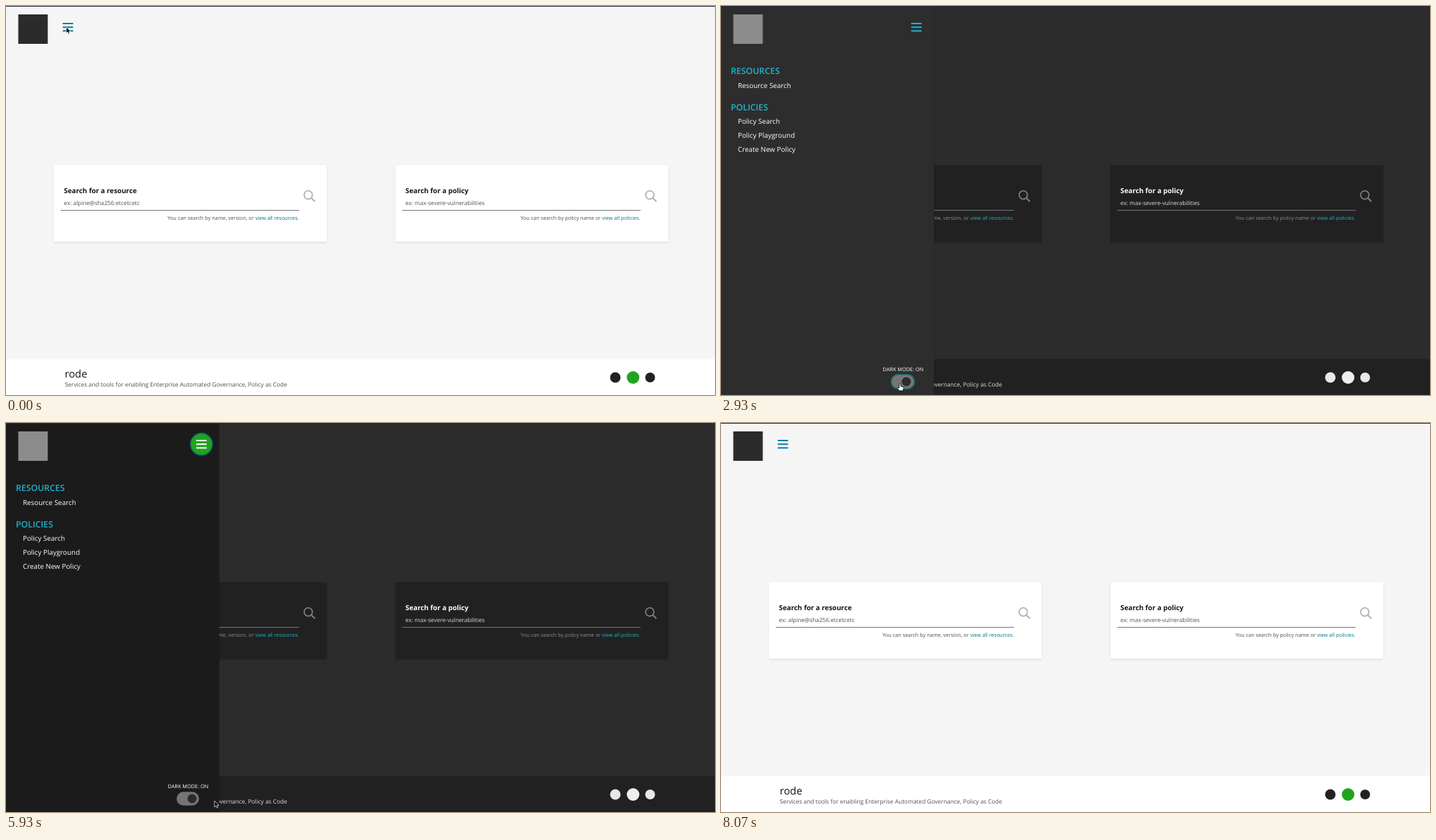
An HTML page for the animation above (8360 ms loop, 1010 by 555 pixels).

```html
<!DOCTYPE html>
<html lang="en">
<head>
<meta charset="utf-8">
<title>rode</title>
<style>
  html, body { margin: 0; width: 100%; height: 100%; overflow: hidden; }
  svg {
    display: block; width: 1010px; height: 555px;
    font: 9.85px "Open Sans", sans-serif; text-rendering: geometricPrecision;
    --page: #f5f5f5; --card: #fff; --edge: #0002; --bar: #2c2a46;
    --text: #151515; --soft: #505050; --hint: #4c4c4c; --link: #00708f;
    --accent: #0a7a9f; --line: #777; --icon: #b3b3b3; --ring: #62c8e0;
    --logo: #2b2b2b; --flame: #20a41f; --social: #222; --track: #6b6b6b; --knob: #fff;
  }
  svg.dark {
    --page: #2c2c2c; --card: #212121; --edge: #0003; --bar: #29273a;
    --text: #fff; --soft: #dedede; --hint: #909090; --link: #22b5cf;
    --accent: #20b4d0; --line: #777; --icon: #7c7c7c; --ring: #14636e;
    --logo: #8c8c8c; --flame: #eee; --social: #e8e8e8; --track: #757575; --knob: #2c2c2c;
  }
  text { fill: var(--text); }
  .title { font-weight: 700; }
  .example { font-size: 8.21px; fill: var(--soft); }
  .hint { font-size: 7.39px; fill: var(--hint); text-anchor: end; }
  .hint tspan { fill: var(--link); }
  .heading { font-size: 12.32px; font-weight: 600; fill: var(--accent); }
  .label { font-size: 7.39px; text-anchor: end; }
</style>
</head>
<body>
<svg id="stage" viewBox="0 0 1010 555">
  <defs>
    <filter id="blur" x="-20%" y="-20%" width="140%" height="140%"><feGaussianBlur stdDeviation="1.2"/></filter>
    <g id="card">
      <rect x="68" y="228" width="389" height="109.5" fill="var(--edge)" filter="url(#blur)"/>
      <rect x="68" y="227" width="389" height="109.5" rx="1" fill="var(--card)"/>
      <path d="M78 291.5H417.5" stroke="var(--line)"/>
      <g fill="none" stroke="var(--icon)" stroke-width="1.8">
        <circle cx="430.6" cy="269.6" r="5.9"/>
        <path d="M434.8 273.8L440 279" stroke-width="2.2"/>
      </g>
    </g>
  </defs>

  <rect width="1010" height="555" fill="var(--page)"/>
  <use href="#card"/>
  <use href="#card" x="486.5"/>
  <text class="title" x="82.6" y="267">Search for a resource</text>
  <text class="example" x="82.6" y="283.7">ex: alpine@sha256:etcetcetc</text>
  <text class="hint" x="417.4" y="304.5">You can search by name, version, or <tspan>view all resources</tspan>.</text>
  <text class="title" x="569" y="267">Search for a policy</text>
  <text class="example" x="569" y="283.7">ex: max-severe-vulnerabilities</text>
  <text class="hint" x="903.7" y="304.5">You can search by policy name or <tspan>view all policies</tspan>.</text>

  <rect y="503.5" width="1010" height="51.5" fill="var(--card)"/>
  <text x="83.7" y="529.7" font-size="14.78">rode</text>
  <text class="example" x="83.7" y="543" style="font-size:8.38px">Services and tools for enabling Enterprise Automated Governance, Policy as Code</text>
  <circle cx="868" cy="530" r="7.5" fill="var(--social)"/>
  <circle cx="893.3" cy="530" r="9" fill="var(--flame)"/>
  <circle cx="917.6" cy="530" r="7" fill="var(--social)"/>

  <g id="sidebar">
    <rect width="304" height="555" fill="var(--edge)" filter="url(#blur)"/>
    <rect id="panel" width="303.5" height="555"/>
    <text class="heading" x="14" y="97.3">RESOURCES</text>
    <text x="24" y="116.5">Resource Search</text>
    <text class="heading" x="14" y="148.5">POLICIES</text>
    <text x="24" y="167.7">Policy Search</text>
    <text x="24" y="187.9">Policy Playground</text>
    <text x="24" y="208">Create New Policy</text>
    <text class="label" id="label" x="288.4" y="521"></text>
    <rect id="toggleRing" x="241.5" y="524.8" width="35" height="22.4" rx="11.2" fill="var(--ring)"/>
    <rect x="243" y="526.3" width="32" height="19.4" rx="9.7" fill="var(--track)"/>
    <circle id="knob" cy="536" r="6.5" fill="var(--knob)"/>
  </g>

  <rect x="17.5" y="12" width="42" height="42" fill="var(--logo)"/>
  <g id="menu">
    <g id="disc">
      <circle cy="1.5" r="15.5" fill="#0004" filter="url(#blur)"/>
      <circle id="menuRing" r="16.5" fill="var(--ring)"/>
      <circle r="14.8" fill="#20a41f"/>
    </g>
    <path id="lines" d="M-7.4 -5.2H7.4M-7.4 0H7.4M-7.4 5.2H7.4" stroke-width="2"/>
  </g>
  <rect width="1010" height="1" fill="var(--bar)"/>

  <g id="cursor" stroke-linejoin="round">
    <path id="arrow" d="M0 0V8.8L2 7L3.4 10.2L4.9 9.5L3.6 6.5H6.2Z" fill="#000" stroke="#fff" stroke-width=".7"/>
    <path id="hand" d="M-1.2 6V.6Q0 -.8 1.2 .6V3.6L4.6 4.5Q5.5 5 5.2 6.2L4.2 10H-.9L-3.8 6.4Q-3.6 5 -2.4 5.5Z" fill="#fff" stroke="#000" stroke-width=".9"/>
    <path id="beam" d="M-2 -4.8Q0 -4.8 0 -3.6Q0 -4.8 2 -4.8M0 -3.6V3.6M-2 4.8Q0 4.8 0 3.6Q0 4.8 2 4.8" fill="none" stroke="#222" stroke-width=".9"/>
  </g>
</svg>
<script>
const LOOP = 8360;
const MENU_CLICKS = { open: [820, 5020], close: [4130, 7180] };
const DARK_ON = 2770, DARK_OFF = 6400;

// time, x, y of the pointer
const POINTER = [
  [0, 86, 30], [270, 86, 30], [300, 88, 25], [1480, 88, 25], [2280, 260, 520], [2430, 260, 520],
  [2530, 255, 539], [3770, 255, 539], [4080, 430, 470], [4420, 430, 470], [4940, 92, 28],
  [5380, 92, 28], [5930, 297, 539], [6200, 258, 538], [6480, 258, 538], [6860, 472, 467],
  [7180, 472, 467], [7600, 944, 0]
];

const $ = id => document.getElementById(id);
const clamp = v => Math.min(1, Math.max(0, v));
const smooth = v => v * v * (3 - 2 * v);
const ramp = (t, start, length) => clamp((t - start) / length);
const within = (t, start, end) => t >= start && t < end;
const show = (id, visible) => $(id).setAttribute('display', visible ? 'inline' : 'none');
const move = (id, x, y) => $(id).setAttribute('transform', `translate(${x} ${y})`);

function pointerAt(t) {
  const i = POINTER.findIndex(p => p[0] > t);
  if (i < 0) return POINTER.at(-1).slice(1);
  const [t0, x0, y0] = POINTER[i - 1], [t1, x1, y1] = POINTER[i];
  const k = smooth(ramp(t, t0, t1 - t0));
  return [x0 + (x1 - x0) * k, y0 + (y1 - y0) * k];
}

function openness(t) {
  const sum = times => times.reduce((s, start) => s + smooth(ramp(t, start, 380)), 0);
  return sum(MENU_CLICKS.open) - sum(MENU_CLICKS.close);
}

function draw(t) {
  const dark = within(t, DARK_ON, DARK_OFF);
  const easeOut = start => 1 - (1 - ramp(t, start, 280)) ** 3;
  const shade = easeOut(DARK_ON) - easeOut(DARK_OFF);
  const open = openness(t);
  const menuX = 88.2 + 190.2 * open;
  const [x, y] = pointerAt(t);

  const menuFocus = within(t, MENU_CLICKS.open[0], DARK_ON) || within(t, MENU_CLICKS.open[1], DARK_OFF);
  const toggleFocus = within(t, DARK_ON, MENU_CLICKS.close[0]) || within(t, DARK_OFF, MENU_CLICKS.close[1]);
  const overMenu = t >= 270 && Math.hypot(x - menuX, y - 30.3) < 15;
  const overToggle = open > .9 && x > 243 && x < 275 && y > 526 && y < 546;
  const overLabel = open > .9 && x > 228 && x < 289 && y > 512 && y < 524;
  const green = menuFocus || overMenu && t >= 670;

  $('stage').classList.toggle('dark', dark);
  const level = Math.round(255 - 228 * shade);
  $('panel').setAttribute('fill', `rgb(${level},${level},${level})`);
  move('sidebar', -312 * (1 - open), 0);
  $('label').textContent = 'DARK MODE: ' + (dark ? 'ON' : 'OFF');
  $('knob').setAttribute('cx', 252.3 + 12.7 * shade);
  show('toggleRing', toggleFocus);

  move('menu', menuX, 30.3);
  show('disc', green);
  show('menuRing', menuFocus);
  $('lines').setAttribute('stroke', green ? '#fff' : 'var(--accent)');

  const hand = overMenu || overToggle;
  move('cursor', x, y);
  show('cursor', t < 7600);
  show('hand', hand);
  show('beam', overLabel);
  show('arrow', !hand && !overLabel);
}

function tick() {
  draw(performance.now() % LOOP);
  requestAnimationFrame(tick);
}
tick();
</script>
</body>
</html>
```
